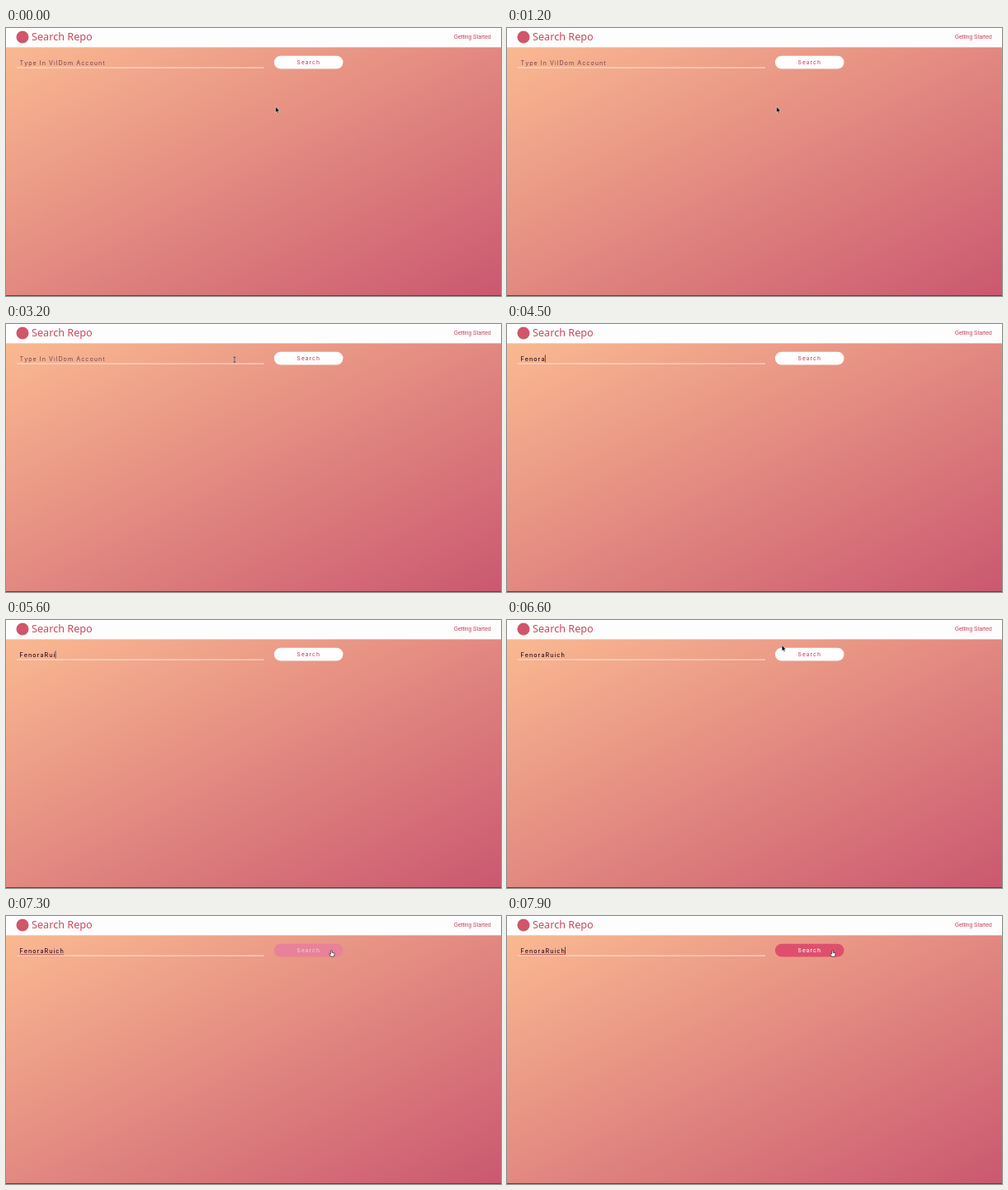
An HTML page that plays this animation: 600 px wide and 325 px high, repeating every 8 s.

```html
<!DOCTYPE html>
<html lang="en">
<head>
<meta charset="utf-8">
<title>Search Repo</title>
<style>
  html, body { margin: 0; width: 100%; height: 100%; overflow: hidden; }
  svg { display: block; width: 100vw; height: 100vh; }
  text { font-family: Inter, "Liberation Sans", sans-serif; font-kerning: none; }
  .brand { font: 12.65px "Noto Sans", "Open Sans", sans-serif; }
  .link { font: 6.7px "Liberation Sans", Arial, sans-serif; }
  .field { font-size: 7.2px; letter-spacing: 1px; }
</style>
</head>
<body>
<svg viewBox="0 0 600 325" preserveAspectRatio="none">
  <defs>
    <linearGradient id="sky" x1="0" y1="0" x2="1" y2="1">
      <stop offset="0" stop-color="#fab991"/>
      <stop offset="1" stop-color="#ca5870"/>
    </linearGradient>
  </defs>

  <rect y="23" width="600" height="302" fill="url(#sky)"/>
  <rect y="324" width="600" height="1" fill="#5c424a"/>
  <rect width="600" height="23.4" fill="#fdfdfd"/>
  <circle cx="20" cy="11" r="7.5" fill="#d0566a"/>
  <text class="brand" x="31" y="15" fill="#c9485c">Search Repo</text>
  <text class="link" x="542.7" y="13" fill="#c93a54">Getting Started</text>

  <rect x="13" y="47.6" width="300" height="1" fill="#fbe3da"/>
  <text id="hint" class="field" x="16.5" y="44.6" fill="#74454f">Type In VilDom Account</text>
  <text id="typed" class="field" x="16.5" y="44.6" font-weight="500" fill="#2c1420"></text>
  <path id="spelling" stroke="#d23a4c" stroke-width="1" stroke-dasharray="1.2 .6"/>
  <rect id="caret" y="37.5" width="0.7" height="9" fill="#2c1420"/>

  <rect id="button" x="325" y="33.8" width="83.5" height="15.8" rx="7.9"/>
  <text id="label" x="352.6" y="44.4" font-size="6.8" font-weight="500" letter-spacing=".9">Search</text>

  <g id="pointer">
    <path id="arrow" d="M0 0V7L1.6 5.6L2.7 8L3.9 7.5L2.8 5.2H5Z" fill="#000" stroke="#fff" stroke-width=".5"/>
    <g id="beam" fill="none" stroke-linecap="round">
      <path d="M-1.2 -3H1.2M0 -3V3M-1.2 3H1.2" stroke="#fff" stroke-opacity=".7" stroke-width="1.5"/>
      <path d="M-1.2 -3H1.2M0 -3V3M-1.2 3H1.2" stroke="#222" stroke-width=".8"/>
    </g>
    <path id="hand" d="M-.8 0Q0 -.8 .8 0V2.2L3 2.7Q3.8 3 3.6 4L3 7H-.9L-2.7 4.2Q-2.6 3 -1.5 3.6L-.8 4Z" fill="#fff" stroke="#222" stroke-width=".7"/>
  </g>
</svg>
<script>
const LOOP = 8000, STEP = 100;
const NAME = "FenoraRuich";
const KEYS = [3900, 4000, 4200, 4300, 4400, 4500, 5100, 5300, 5500, 5700, 5800];
const LEFT = 16.5;
const WHITE = [254, 254, 254], PINK = [222, 79, 109], RED = [196, 80, 98];

const $ = id => document.getElementById(id);
const show = (id, on) => $(id).setAttribute("visibility", on ? "visible" : "hidden");
const ramp = (t, from, to) => Math.min(1, Math.max(0, (t - from) / (to - from)));
const smooth = u => u * u * (3 - 2 * u);
const lerp = (a, b, u) => a + (b - a) * u;
const mix = (a, b, u) => `rgb(${a.map((v, i) => Math.round(lerp(v, b[i], u)))})`;

function caretOn(t) {
  if (t < 2500) return false;
  if (t < 3900) return t < 3000 || t >= 3500;
  if (t < 5800) return t < 5000 || t >= 5100;
  return (t - 5800) % 1000 < 500;
}

function pointerAt(t) {
  if (t < 3900) {
    const u = smooth(ramp(t, 1700, 2300));
    return [lerp(326.8, 277, u), lerp(95.5, 43.2, u)];
  }
  const u = smooth(ramp(t, 6600, 7300));
  return [lerp(333.2, 394.5, u), lerp(30.6, 42.2, u)];
}

function drawField(t) {
  const count = KEYS.filter(k => k <= t).length;
  const typed = $("typed");
  typed.textContent = NAME.slice(0, count);
  const width = count ? typed.getComputedTextLength() - 0.6 : 0;
  show("hint", count === 0);
  $("caret").setAttribute("x", LEFT + width);
  show("caret", caretOn(t));
  $("spelling").setAttribute("d", `M${LEFT} 46.6h${width}`);
  show("spelling", t >= 6700);
}

function drawPointer(t) {
  const [x, y] = pointerAt(t);
  const visible = t < 3900 || t >= 6600;
  const beam = t < 3900 && y < 50;
  const hand = t >= 6900;
  $("pointer").setAttribute("transform", `translate(${x} ${y})`);
  show("arrow", visible && !beam && !hand);
  show("beam", visible && beam);
  show("hand", visible && hand);
}

function drawButton(t) {
  const hover = 1 - (1 - ramp(t, 6900, 7900)) ** 2.4;
  $("button").setAttribute("fill", mix(WHITE, PINK, hover));
  $("label").setAttribute("fill", mix(RED, WHITE, hover));
}

function draw(now) {
  const t = Math.floor((now % LOOP) / STEP) * STEP;
  drawField(t);
  drawButton(t);
  drawPointer(t);
}

let start;
function tick(now) {
  start ??= now;
  draw(now - start);
  requestAnimationFrame(tick);
}
draw(0);
requestAnimationFrame(tick);
</script>
</body>
</html>
```
